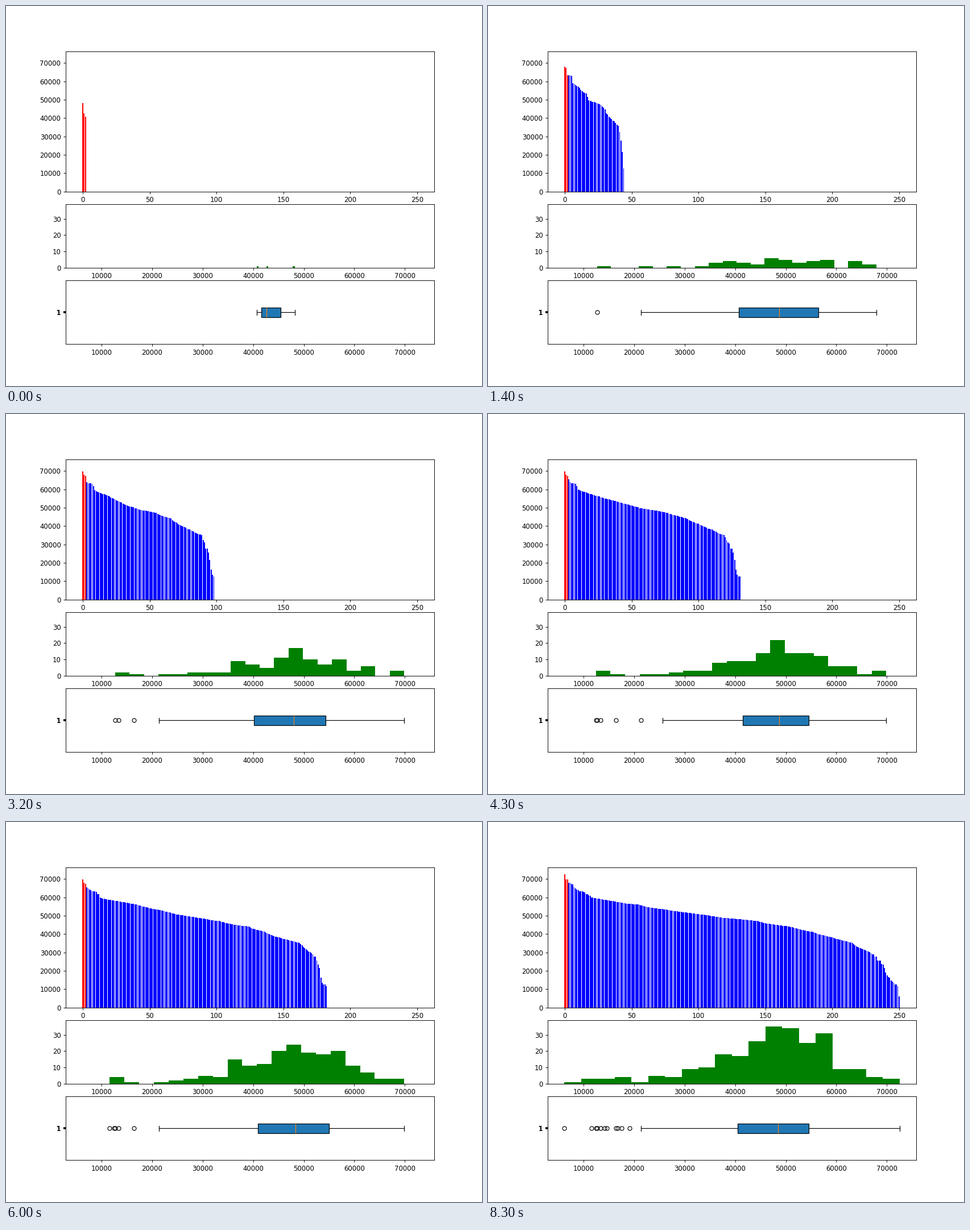
Write a matplotlib script that moves like this. It is 837x669 px and loops after 8.4 s.

```python
import random
from itertools import pairwise

import matplotlib.pyplot as plt
from matplotlib.animation import FuncAnimation

W, H, DPI = 837, 669, 83.625
FRAMES, INTERVAL, STEP = 84, 100, 3
XLIM = (2841, 75870)
XTICKS = range(10000, 70001, 10000)

# Each stage adds this many values between neighbouring edges, plus tail
# values that come in first, somewhere in between, or last.
EDGES = [30000, *range(35000, 56001, 3000), 60000]
STAGES = [
    ([1, 3, 4, 1, 3, 9, 1, 5, 6], [],
     [12650, 21400, 27800, 62950, 63150, 63200, 63250], [67300, 67900]),
    ([1, 6, 4, 3, 8, 7, 9, 3, 6], [],
     [13400, 16350, 25570, 27600, 61700, 63900], [69900]),
    ([2, 0, 1, 4, 3, 5, 5, 6, 5], [], [12450], [65500]),
    ([4, 6, 1, 3, 8, 4, 3, 4, 11], [],
     [11600, 23500, 28900, 29600, 61800], [64300, 64900]),
    ([3, 0, 1, 1, 1, 10, 7, 3, 6], [72550, 69700],
     [17550, 23700, 25400, 25700, 60800, 61200, 62700, 66900], []),
    ([2, 0, 2, 5, 1, 0, 5, 2, 2], [6160],
     [14100, 14600, 16700, 19050, 29000], [67850]),
]


def widest_middle(vals, a, b):
    """Middle of the widest gap that the values leave between a and b."""
    pts = sorted([a, b] + [v for v in vals if a < v < b])
    lo, hi = max(pairwise(pts), key=lambda p: p[1] - p[0])
    return (lo + hi) / 2


def grow(data, counts, first, mid, last, rng):
    """Append one stage, filling each interval evenly."""
    extra = []
    for (a, b), count in zip(pairwise(EDGES), counts):
        for _ in range(count):
            extra.append(widest_middle(data + extra, a, b))
    middle = mid + extra
    rng.shuffle(middle)
    return data + first + middle + last


rng = random.Random(7)
data = [48200, 42600, 40700]
for stage in STAGES:
    data = grow(data, *stage, rng)

fig = plt.figure(figsize=((W + 0.001) / DPI, (H + 0.001) / DPI), dpi=DPI,
                 facecolor="white")
grid = fig.add_gridspec(4, 1, left=0.125, right=0.9, bottom=0.11, top=0.88,
                        hspace=0.2)
bar_ax = fig.add_subplot(grid[:2])
hist_ax = fig.add_subplot(grid[2])
box_ax = fig.add_subplot(grid[3])

size = len(data)
bars = bar_ax.bar(range(size), [1] * size,
                  color=["r"] * 3 + ["b"] * (size - 3))
bar_ax.set(xlim=(-12.94, 262.94), ylim=(0, max(data) * 1.05),
           xticks=range(0, 251, 50), yticks=range(0, 70001, 10000))


def draw_hist(vals):
    hist_ax.clear()
    hist_ax.hist(vals, bins=20, color="g")
    hist_ax.set(xlim=XLIM, ylim=(0, 38.85), xticks=XTICKS,
                yticks=range(0, 31, 10))


def draw_box(vals):
    box_ax.clear()
    box_ax.boxplot(vals, vert=False, patch_artist=True, widths=0.15,
                   manage_ticks=False)
    box_ax.set(xlim=XLIM, ylim=(0.5, 1.5), xticks=XTICKS)
    # Stacked labels give the heavy look of the single tick.
    box_ax.set_yticks([1] * 8, ["1"] * 8)
    box_ax.tick_params(axis="y", width=2)


def update(i):
    vals = sorted(data[:STEP * (i + 1)], reverse=True)
    for k, bar in enumerate(bars):
        bar.set_visible(k < len(vals))
        if k < len(vals):
            bar.set_height(vals[k])
    draw_hist(vals)
    draw_box(vals)
    return []


anim = FuncAnimation(fig, update, frames=FRAMES, interval=INTERVAL,
                     init_func=lambda: update(0), repeat=True, blit=False)
plt.show()
```
